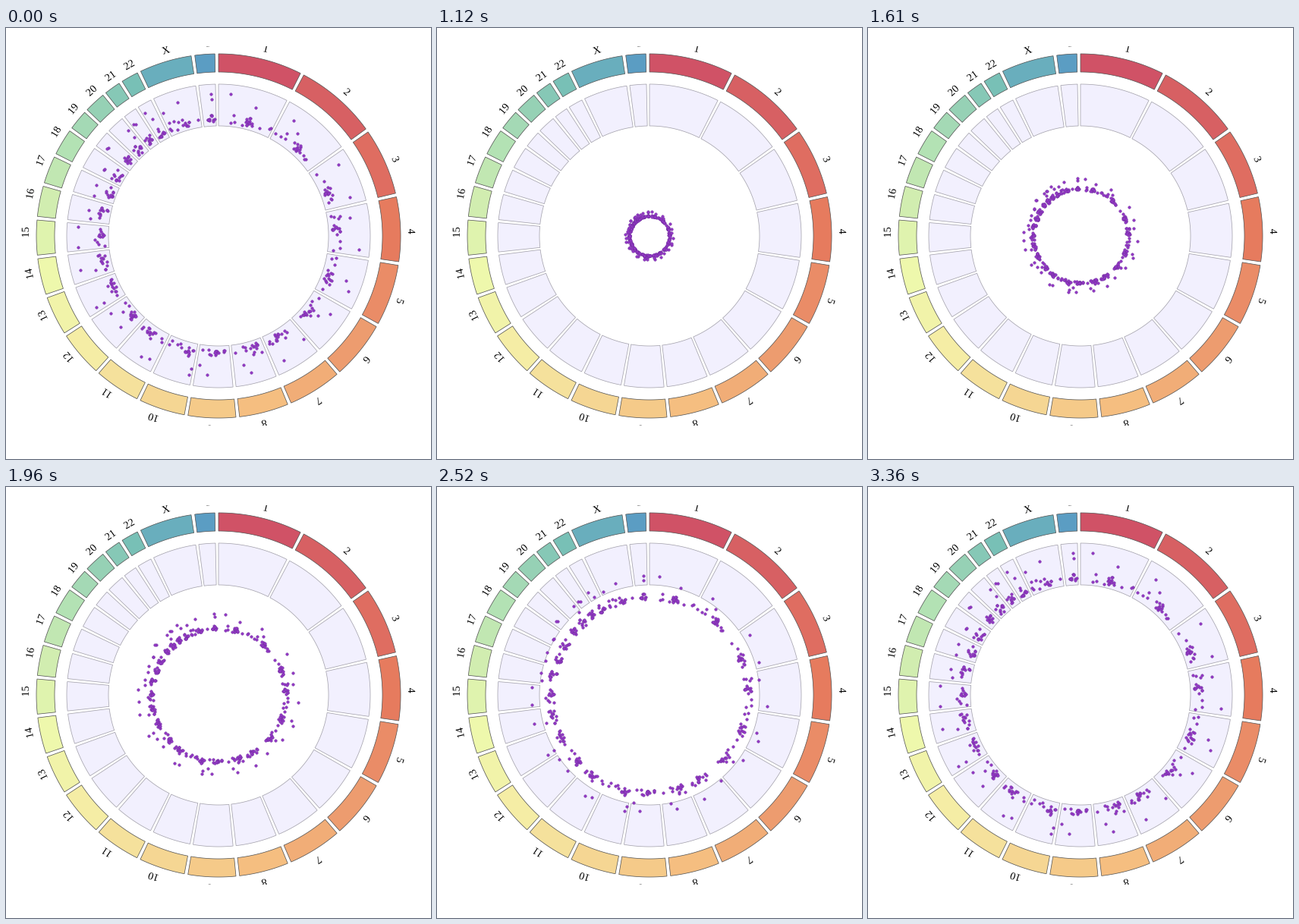
Animation, 560 px wide and 568 px high, one loop 3.43 s. Source, as a matplotlib script:

```python
import numpy as np
import matplotlib.pyplot as plt
from matplotlib.animation import FuncAnimation
from matplotlib.colors import LinearSegmentedColormap
from matplotlib.patches import PathPatch, Rectangle
from matplotlib.textpath import TextPath
from matplotlib.transforms import Affine2D

W, H, DPI = 560, 568, 100
PT = 72 / DPI
CX, CY = 280, 274
FRAMES, INTERVAL = 49, 70
START, SPAN = 10.9, 30      # launch time and flight length, in frames
PAD = 0.02                  # gap between chromosomes, radians

# Human chromosome lengths in megabases, 1 to 22, X, Y
SIZES = np.array([249, 243, 198, 191, 181, 171, 159, 146, 141, 136, 135, 134,
                  115, 107, 103, 90, 81, 78, 59, 63, 48, 51, 155, 59])
NAMES = [str(n) for n in range(1, 23)] + ["X", "Y"]
RAINBOW = LinearSegmentedColormap.from_list("rainbow", [
    (0, "#d05266"), (3 / 23, "#e67b5e"), (7 / 23, "#f5be80"),
    (11 / 23, "#f5eda5"), (13 / 23, "#eef8ac"), (17 / 23, "#b3e2b4"),
    (21 / 23, "#78c0b6"), (1, "#5b9dc3")], N=512)


def polar(r, a):
    """Offset from the centre; angle clockwise from the top, y down."""
    return np.column_stack([r * np.sin(a), -r * np.cos(a)])


def sector(r0, r1, a0, a1, **style):
    a = np.linspace(a0, a1, 60)
    ring = np.vstack([polar(r1, a), polar(r0, a[::-1])]) + (CX, CY)
    ax.fill(ring[:, 0], ring[:, 1], joinstyle="miter", lw=0.75 * PT, **style)


def label(text, a, r=250, size=14):
    glyphs = TextPath((0, 0), text, size=size,
                      prop={"family": "Liberation Serif"})
    place = Affine2D().scale(1, -1).translate(0, -r).rotate(a).translate(CX, CY)
    patch = PathPatch(place.transform_path(glyphs), fc="black", lw=0)
    ax.add_patch(patch)
    patch.set_clip_path(Rectangle((0, CY - 250), W, 500,
                                  transform=ax.transData))


def sector_points(rng, a0, arc, size):
    """Dots hugging the inner rim, half of them in a clump, plus two strays."""
    n = 8 + round(size / 20)
    clump = rng.normal(rng.uniform(0.25, 0.75), 0.025 / arc, n // 2)
    spread = rng.random(n - n // 2)
    where = np.concatenate([clump, spread, rng.random(2)]).clip(0, 1)
    r = np.concatenate([149 + 15 * rng.beta(1.6, 2.2, n),
                        rng.uniform(168, 190, 2)])
    edge = 0.015
    return polar(r, a0 + edge + where * (arc - 2 * edge))


fig = plt.figure(figsize=(W / DPI, H / DPI), dpi=DPI, facecolor="white")
ax = fig.add_axes([0, 0, 1, 1])
ax.set(xlim=(0, W), ylim=(H, 0))
ax.axis("off")

rng = np.random.default_rng(7)
arcs = SIZES * (2 * np.pi - PAD * len(SIZES)) / SIZES.sum()
starts = np.cumsum(arcs + PAD) - arcs - PAD
clouds = []
for k, (name, a, arc) in enumerate(zip(NAMES, starts, arcs)):
    sector(216, 240, a, a + arc, fc=RAINBOW(k / 23), ec="#555555")
    sector(145, 200, a, a + arc, fc="#f2f0fe", ec="#a4a2ac")
    label(name, a + arc / 2)
    clouds.append(sector_points(rng, a, arc, SIZES[k]))

points = np.vstack(clouds)
dots = ax.scatter(points[:, 0], points[:, 1], s=(3.5 * PT) ** 2,
                  c="#9438c6", edgecolors="#7430a2", linewidths=0.5 * PT,
                  zorder=5)


def draw(i):
    t = (i - START) / SPAN
    scale = t if 0 <= t < 1 else 1
    dots.set_offsets(points * scale + (CX, CY))
    return dots,


anim = FuncAnimation(fig, draw, frames=FRAMES, interval=INTERVAL,
                     repeat=True, repeat_delay=0)
plt.show()
```
